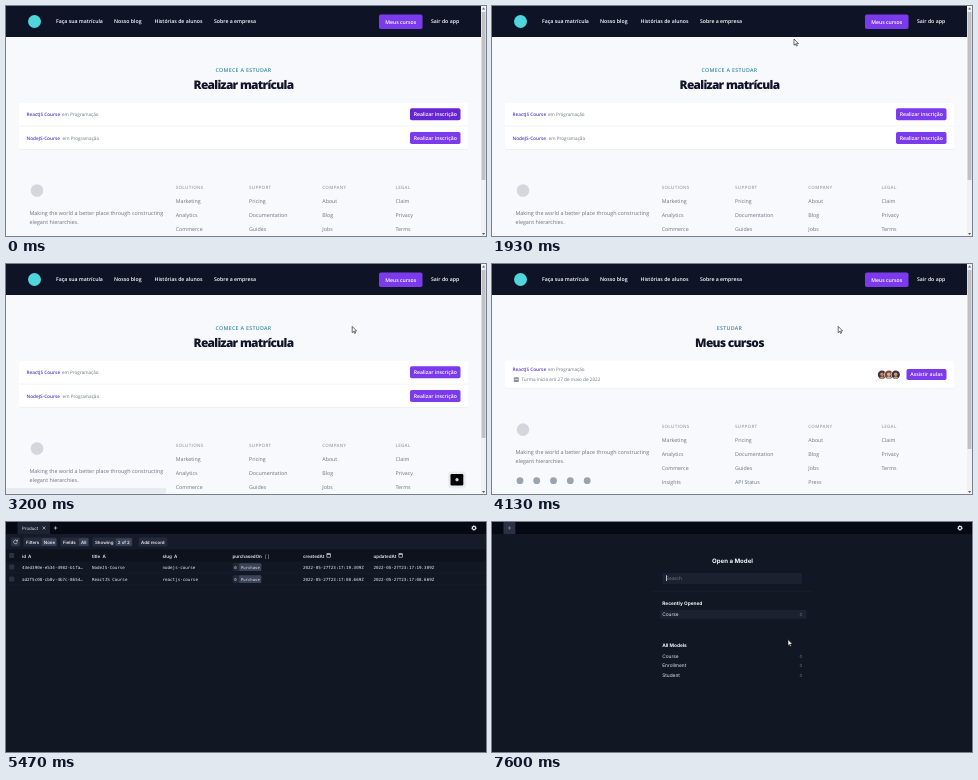
An HTML page for the animation above (8000 ms loop, 480 by 230 pixels).

```html
<!DOCTYPE html>
<html lang="pt">
<head>
<meta charset="utf-8">
<style>
  html, body { margin: 0; width: 100%; height: 100%; overflow: hidden; background: #f8f9fc; }
  svg { display: block; width: 100vw; height: 100vh; }
  text { font-family: "Open Sans", "Noto Sans", sans-serif; text-rendering: geometricPrecision; white-space: pre; }
  .studio text { font-family: Inter, Roboto, sans-serif; }
  .studio .mono { font-family: "DejaVu Sans Mono", "Noto Sans Mono", monospace; }
</style>
</head>
<body>
<svg id="stage" viewBox="0 0 480 230"></svg>
<script>
const LOOP = 8000;
const PURPLE = '#7c3aed', PURPLE_HOVER = '#6526d2';
const stage = document.getElementById('stage');

// Markup helpers
const text = (x, y, size, fill, content, extra = '') =>
  `<text x="${x}" y="${y}" font-size="${size}" fill="${fill}" ${extra}>${content}</text>`;
const rect = (x, y, w, h, fill, extra = '') =>
  `<rect x="${x}" y="${y}" width="${w}" height="${h}" fill="${fill}" ${extra}/>`;
const circle = (x, y, r, fill, extra = '') =>
  `<circle cx="${x}" cy="${y}" r="${r}" fill="${fill}" ${extra}/>`;
const path = (d, stroke, width = 0.6, extra = '') =>
  `<path d="${d}" fill="none" stroke="${stroke}" stroke-width="${width}" ${extra}/>`;
const group = (id, content, extra = '') => `<g id="${id}" ${extra}>${content}</g>`;
const SEMI = 'font-weight="600"', BOLD = 'font-weight="700"', MID = 'text-anchor="middle"';

const button = (id, x, y, w, h, label) =>
  rect(x, y, w, h, PURPLE, `id="${id}" rx="1.8"`) +
  text(x + w / 2, y + h / 2 + 1.85, 5.15, '#fff', label, `${SEMI} ${MID}`);

// Course site
function header() {
  const links = [[50, 'Faça sua matrícula'], [108, 'Nosso blog'], [148.5, 'Histórias de alunos'],
    [208, 'Sobre a empresa'], [425, 'Sair do app']];
  return rect(0, 0, 475, 31, '#0e1326') + circle(28.5, 15.5, 6.5, '#4fd5dc') +
    links.map(([x, label]) => text(x, 17.4, 5.2, '#fff', label, SEMI)).join('') +
    button('myCourses', 373, 8.5, 43.5, 14.5, 'Meus cursos');
}

const heading = (kicker, title) =>
  text(237.5, 66, 5.3, '#3a8aa6', kicker, `${SEMI} ${MID} letter-spacing=".3"`) +
  text(237.5, 83, 11.9, '#10152a', title, `font-weight="800" ${MID} letter-spacing="-.7"`);

const card = (y, h) =>
  rect(13, y + 0.6, 449, h, '#e6e8ee', 'rx="2"') + rect(13, y, 449, h, '#fff', 'rx="2"');

const course = (y, name, next) =>
  text(20.5, y, 4.7, '#4f3cc9', name, SEMI) + text(next, y, 4.6, '#6b7280', 'em Programação');

const enrollPage = heading('COMECE A ESTUDAR', 'Realizar matrícula') + card(97, 46) +
  rect(13, 119.8, 449, 0.5, '#e5e7eb') +
  course(109.8, 'ReactJS Course', 56) + button('enrollReact', 404, 102.3, 50.5, 12, 'Realizar inscrição') +
  course(133.5, 'NodeJS-Course', 56.6) + button('enrollNode', 404, 126, 50.5, 12, 'Realizar inscrição');

const avatar = (x, hair, skin) =>
  circle(x, 110.8, 4.7, '#fff') + circle(x, 110.8, 4.2, hair) +
  circle(x, 110.2, 1.8, skin) + `<path d="M${x - 2.6} 114q2.6-3.6 5.2 0q-2.6 2-5.2 0" fill="${skin}"/>`;

const courseCard = card(96.5, 28) + course(107.3, 'ReactJS Course', 56) +
  rect(21.8, 113.2, 5, 4.8, '#8b91a0', 'rx=".8"') + rect(22.6, 115, 3.4, 0.6, '#fff') +
  text(29.5, 117.3, 4.7, '#6b7280', 'Turma inicia em 27 de maio de 2022') +
  avatar(390, '#4a342f', '#b98a76') + avatar(396.8, '#7a4a3c', '#d9ae98') + avatar(403.7, '#3c3336', '#c59a88') +
  button('watch', 414.5, 105, 40, 11, 'Assistir aulas');

function footer() {
  const columns = [
    [169.7, 'SOLUTIONS', 'Marketing', 'Analytics', 'Commerce', 'Insights'],
    [243, 'SUPPORT', 'Pricing', 'Documentation', 'Guides', 'API Status'],
    [316.3, 'COMPANY', 'About', 'Blog', 'Jobs', 'Press'],
    [389.5, 'LEGAL', 'Claim', 'Privacy', 'Terms']];
  return circle(31, 184.5, 6.3, '#d3d6dc') +
    text(23.5, 209.2, 5.4, '#6b7280', 'Making the world a better place through constructing') +
    text(23.5, 217.7, 5.4, '#6b7280', 'elegant hierarchies.') +
    [28, 44.7, 61.5, 78.3, 95.2].map(x => circle(x, 235.6, 3.4, '#9ca3af')).join('') +
    columns.map(([x, title, ...links]) =>
      text(x, 182.6, 4.5, '#9ca3af', title, `${SEMI} letter-spacing=".3"`) +
      links.map((label, i) => text(x, 196.7 + i * 14.1, 5.3, '#6b7280', label)).join('')).join('');
}

const scrollbar = rect(475, 0, 5, 230, '#f1f1f1') +
  rect(475.6, 6, 3.9, 168, '#c1c1c1', 'id="thumb"') +
  '<path d="M476 3.6l1.6-2 1.6 2zM476 227l1.6 2 1.6-2z" fill="#606060"/>';

const dialog = rect(160.5, 0, 160.5, 45.5, '#000', 'opacity=".2" rx="1.5"') +
  rect(161.8, 0, 157.6, 44, '#202124', 'rx="1"') +
  text(167, 10, 5.1, '#e8eaed', 'localhost:3000 diz') +
  text(167, 19.8, 4.3, '#e8eaed', 'Compra realizada com sucesso!') +
  rect(290.8, 27.2, 23, 11.6, '#8ab4f8', 'rx="1.8"') +
  rect(291.8, 28.2, 21, 9.6, '#7c9fdc', 'rx="1.2" stroke="#202124" stroke-width=".5"') +
  text(302.2, 34.6, 4.2, '#202124', 'OK', MID);

const statusBar = rect(0, 224, 55.5, 6, '#202124') +
  text(1.8, 228.6, 4, '#e8eaed', 'localhost:3000/app/courses');

const buildBadge = rect(442, 207.5, 18, 17, '#000', 'opacity=".05" rx="4"') +
  rect(444.5, 210, 12.8, 11.5, '#000', 'rx="1.2"') + circle(451, 215.7, 1.6, '#d8d8d8');

// Database browser
const plus = (x, color) => path(`M${x - 1.7} 6h3.4M${x} 4.3v3.4`, color, 0.6);
const gear = circle(468, 6, 1.6, 'none', 'stroke="#e6e9f0" stroke-width="1.1"') +
  circle(468, 6, 2.4, 'none', 'stroke="#e6e9f0" stroke-width=".7" stroke-dasharray=".94"');
const studioBase = rect(0, 0, 480, 230, '#121823') + rect(0, 0, 480, 12, '#060914') + gear;

function tablePage() {
  const pill = (x, w, label, lx, value, vx) =>
    rect(x, 15.5, w, 9, '#232a3a', 'rx="1.2"') + text(lx, 21.6, 4.4, '#e6e9f0', label, SEMI) +
    (value ? rect(vx - 2, 16.2, x + w - vx + 1.3, 7.6, '#394257', 'rx="1"') +
      text(vx, 21.6, 4.4, '#e6e9f0', value, SEMI) : '');
  const columns = [[16, 'id', 22], [86, 'title', 96.5], [156.5, 'slug', 168], [226.5, 'purchasedOn', 259],
    [297, 'createdAt', 320.5], [367.5, 'updatedAt', 392.5]];
  const icon = (x, i) => i < 3 ? text(x, 35.5, 4.5, '#e6e9f0', 'A', SEMI)
    : i === 3 ? text(x, 35.5, 4.3, '#e6e9f0', '[ ]')
    : rect(x + 0.4, 31.8, 3.4, 3.4, 'none', 'stroke="#e6e9f0" stroke-width=".6"') + rect(x + 0.4, 31.6, 3.4, 1, '#e6e9f0');
  const rows = [
    ['43ed390e-e534-4982-b1fa…', 'NodeJS-Course', 'nodejs-course', '2022-05-27T23:17:19.309Z'],
    ['ad2f5c08-cb0v-4b7c-8654…', 'ReactJS Course', 'reactjs-course', '2022-05-27T23:17:08.669Z']];
  const checkbox = y => rect(3.2, y, 5, 5, '#2b3243', 'rx=".8"');
  const row = ([id, title, slug, date], i) => {
    const y = 46.6 + i * 11.9;
    const cell = (x, s, size = 4.22) => text(x, y, size, '#e6e9f0', s, 'class="mono"');
    return checkbox(y - 4) + cell(16, id) + cell(86, title) + cell(156.5, slug) +
      rect(226.8, y - 5.3, 28.5, 7.8, '#222939', 'rx="1"') + rect(233.2, y - 5.3, 22.1, 7.8, '#3a4357', 'rx="1"') +
      cell(228.3, '0', 3.9) + cell(235, 'Purchase', 3.9) + cell(297, date) + cell(367.5, date) +
      rect(0, y + 4.2, 480, 0.4, '#1b2230');
  };
  return rect(0, 12, 480, 15.5, '#151b28') + rect(0, 27.5, 480, 12, '#0d121c') +
    rect(11.5, 0, 32.5, 12, '#1c2332', 'id="tab"') + text(16, 7.6, 4.4, '#e6e9f0', 'Product') +
    path('M36.6 4.6l2.8 2.8M39.4 4.6l-2.8 2.8', '#e6e9f0') + plus(49.5, '#e6e9f0') +
    rect(5, 15.5, 9, 9, '#2a3142', 'rx="1.2"') +
    path('M11.2 19a1.9 1.9 0 1 0 .2 1.4M11.5 17.6v1.6h-1.6', '#e6e9f0', 0.6) +
    pill(17.5, 33.5, 'Filters', 20, 'None', 37.8) + pill(54.5, 28.5, 'Fields', 57, 'All', 75) +
    pill(86.5, 40, 'Showing', 89, '2 of 2', 111.8) + pill(132.7, 28.6, 'Add record', 135, '', 0) +
    checkbox(31) + columns.map(([x, name, ix], i) =>
      text(x, 35.5, 4.5, '#e6e9f0', name, SEMI) + icon(ix, i)).join('') +
    rows.map(row).join('');
}

function modelPage() {
  const model = (y, name) => text(170.2, y, 4.8, '#e6e9f0', name) + text(309, y, 4.4, '#697187', '0', MID);
  return rect(11.5, 0, 11.8, 12, '#2a3145') + plus(17.4, '#8f97aa') +
    text(240.5, 41, 6.1, '#f4f6fa', 'Open a Model', `${BOLD} ${MID}`) +
    rect(170.5, 51, 139.5, 11, '#1b212e', 'rx="1"') + text(174, 58, 4.8, '#747c90', 'Search') +
    rect(174.3, 53.2, 0.7, 5.8, '#f4f6fa', 'id="caret"') +
    rect(160, 69.4, 160, 0.4, '#1d2432') +
    text(170.2, 83, 4.8, '#f4f6fa', 'Recently Opened', BOLD) +
    rect(168, 88, 146.5, 8.7, '#1b2230', 'rx="1"') + model(94.2, 'Course') +
    text(170.2, 125, 4.8, '#f4f6fa', 'All Models', BOLD) +
    model(136.2, 'Course') + model(145.4, 'Enrollment') + model(154.6, 'Student');
}

const pointer = group('cursor',
  '<path id="arrow" d="M0 0V6.2L1.4 4.9 2.4 7.1 3.4 6.6 2.4 4.6H4.4Z" fill="#fff" stroke="#111" stroke-width=".6"/>' +
  '<path id="hand" d="M-.7 .4Q0-.4.7.4V3L3.5 3.6Q4.3 4 4.1 5L3.4 8H-.6L-2.6 4.8Q-2.4 4-1.5 4.4L-.7 5.2Z" fill="#fff" stroke="#111" stroke-width=".6"/>');

stage.innerHTML =
  group('site', rect(0, 0, 480, 230, '#f8f9fc') + header() +
    group('enroll', enrollPage) + group('courses', heading('ESTUDAR', 'Meus cursos') + group('courseCard', courseCard)) +
    group('footer', footer()) + scrollbar + group('badge', buildBadge) +
    group('status', statusBar) + group('loading', rect(0, 224, 160, 6, '#e9ebf0')) + group('dialog', dialog)) +
  group('studio', studioBase + group('table', tablePage()) + group('models', modelPage()), 'class="studio"') +
  pointer;

const el = Object.fromEntries([...stage.querySelectorAll('[id]')].map(node => [node.id, node]));

// Pointer stops: time, x, y
const route = [
  [70, 300, 205], [330, 430, 109], [470, 430, 109], [600, 315.7, 118.2], [1250, 315.7, 118.2],
  [1600, 302, 33], [1930, 302, 33], [2400, 378, 13], [2800, 378, 13], [3130, 346.2, 62.4],
  [4270, 346.2, 62.4], [4640, 130, 118], [5070, 326, 23.5], [5469, 326, 23.5],
  [5800, 349, 37], [6270, 37.5, 5], [6600, 37.5, 5], [7130, 296, 117.5], [LOOP, 296, 117.5]];

const clamp = v => Math.min(1, Math.max(0, v));
const ease = v => v * v * (3 - 2 * v);

function pointerAt(t) {
  const i = Math.max(1, route.findIndex(stop => t < stop[0]));
  const [t0, x0, y0] = route[i - 1], [t1, x1, y1] = route[i];
  const k = ease(clamp((t - t0) / (t1 - t0)));
  return [x0 + (x1 - x0) * k, y0 + (y1 - y0) * k];
}

const show = (node, visible) => { node.style.display = visible ? '' : 'none'; };

function draw(t) {
  const within = (a, b) => t >= a && t < b;
  const onStudio = t >= 5470, onCourses = t >= 3470, loaded = t >= 4130;
  show(el.site, !onStudio);
  show(el.studio, onStudio);
  show(el.enroll, !onCourses);
  show(el.courses, onCourses);
  show(el.courseCard, loaded);
  el.footer.setAttribute('transform', `translate(0 ${loaded ? -18.9 : onCourses ? -47 : 0})`);
  el.thumb.setAttribute('height', loaded ? 179 : onCourses ? 205 : 168);

  show(el.dialog, within(1070, 1800));
  show(el.status, within(2330, 2930));
  el.loading.style.opacity = t < 3000 ? 0 : 1 - clamp((t - 3800) / 130);
  el.badge.style.opacity = clamp((t - 2870) / 200) * (1 - clamp((t - 3400) / 200));

  show(el.table, t < 6600);
  show(el.models, t >= 6600);
  show(el.caret, t < 7100 || t >= 7600);

  const [x, y] = pointerAt(t);
  const overEnroll = t < 510, overCourses = within(2370, 2850);
  el.enrollReact.setAttribute('fill', overEnroll ? PURPLE_HOVER : PURPLE);
  el.myCourses.setAttribute('fill', overCourses ? PURPLE_HOVER : PURPLE);
  const hand = within(280, 510) || overCourses || within(6200, 6650);
  show(el.hand, hand);
  show(el.arrow, !hand);
  show(el.cursor, t >= 70 && !within(5470, 5800));
  el.cursor.setAttribute('transform', `translate(${x} ${y})`);
}

function tick() {
  draw(performance.now() % LOOP);
  requestAnimationFrame(tick);
}
tick();
</script>
</body>
</html>
```
